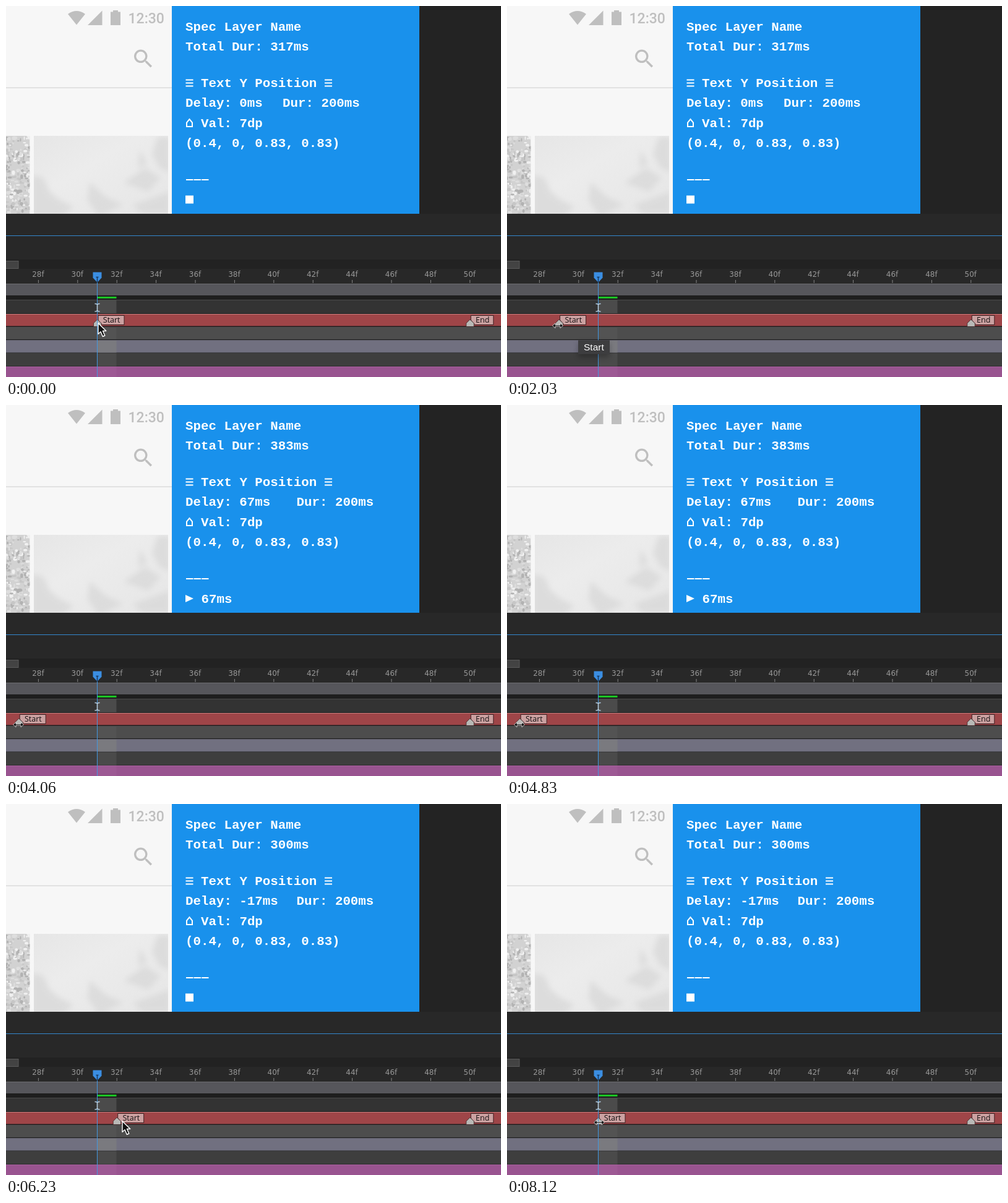
Recreate the animation shown at these times as an HTML page. Size 800 by 600 pixels, loop 8.19 s.

```html
<!DOCTYPE html>
<html lang="en">
<head>
<meta charset="utf-8">
<title>Layer timing</title>
<style>
  html, body { margin: 0; width: 100%; height: 100%; overflow: hidden; background: #232323; }
  svg { display: block; width: 800px; height: 600px; }
  .spec { font: bold 20.8px "Courier New", "Liberation Mono", monospace; fill: #fff; white-space: pre; }
  .ruler { font: 12px "DejaVu Sans", sans-serif; fill: #979797; text-anchor: middle; }
  .tag { font: 12.5px "Open Sans", sans-serif; fill: #161012; }
  .tip { font: 15.5px "Liberation Sans", Arial, sans-serif; fill: #fff; }
  .clock { font: 500 23px Roboto, sans-serif; fill: #bfbfbf; }
</style>
</head>
<body>
<svg viewBox="0 0 800 600">
  <defs>
    <linearGradient id="photo" x2="1" y2="1">
      <stop offset="0" stop-color="#e6e6e6"/>
      <stop offset=".4" stop-color="#ececec"/>
      <stop offset="1" stop-color="#e6e6e6"/>
    </linearGradient>
    <filter id="soft" x="-50%" y="-50%" width="200%" height="200%"><feGaussianBlur stdDeviation="5"/></filter>
    <filter id="fine" x="-50%" y="-50%" width="200%" height="200%"><feGaussianBlur stdDeviation=".7"/></filter>
    <clipPath id="bigClip"><rect x="45" y="210" width="217" height="126"/></clipPath>
    <clipPath id="smallClip"><rect y="210" width="38.500" height="126"/></clipPath>
  </defs>

  <!-- phone preview -->
  <rect width="268" height="336" fill="#f7f7f7"/>
  <rect y="131.500" width="268" height="1.500" fill="#dcdcdc"/>
  <g fill="#bfbfbf">
    <path d="M100 13Q114 3 128 13L114 30.500Z"/>
    <path d="M132 31H155.500V7.500Z"/>
    <path d="M173 7h8v2.500h4V31h-16V9.500h4z"/>
    <path transform="translate(202 65.500) scale(1.660)" d="M15.500 14h-.79l-.28-.27A6.470 6.470 0 0 0 16 9.500 6.500 6.500 0 1 0 9.500 16c1.610 0 3.090-.59 4.230-1.570l.27.28v.79l5 4.990L20.490 19l-4.990-5zm-6 0a4.500 4.500 0 1 1 0-9 4.500 4.500 0 0 1 0 9z"/>
  </g>
  <text class="clock" x="197.500" y="28">12:30</text>
  <g clip-path="url(#smallClip)">
    <rect y="210" width="38.500" height="126" fill="#d2d2d2"/>
    <g id="foliage" filter="url(#fine)"></g>
  </g>
  <g clip-path="url(#bigClip)">
    <rect x="45" y="210" width="217" height="126" fill="url(#photo)"/>
    <g filter="url(#soft)" fill="#d9d9d9" opacity=".8">
      <path d="M40 275Q62 272 66 290T110 325L90 340H40Z"/>
      <path d="M135 285L160 308 190 322 150 340 132 315Z"/>
      <path d="M245 212L236 240 248 262 266 270V212Z"/>
      <path d="M216 232L228 256 214 262Z"/>
      <path d="M190 286L225 262 250 278 230 300Z"/>
      <path d="M205 322L265 300V336H220Z"/>
    </g>
  </g>

  <!-- spec panel -->
  <rect x="268" width="400" height="336" fill="#1991ec"/>
  <g class="spec">
    <text x="290" y="40">Spec Layer Name</text>
    <text id="total" x="290" y="72"></text>
    <text x="315" y="131">Text Y Position</text>
    <text id="delay" x="290" y="163"></text>
    <text id="dur" y="163">Dur: 200ms</text>
    <text x="315" y="196">Val: 7dp</text>
    <text x="290" y="228">(0.4, 0, 0.83, 0.83)</text>
    <text id="wait" x="315.500" y="320"></text>
  </g>
  <g stroke="#fff" stroke-width="2" fill="none">
    <path d="M290.500 119.500h12M290.500 124.500h12M290.500 129.500h12M515 119.500h12M515 124.500h12M515 129.500h12"/>
    <path d="M292 195V188.500L296.500 183L301 188.500V195Z"/>
    <path d="M291 281h11.500M303.500 281h11.500M316 281h11.500"/>
  </g>
  <rect id="square" x="290" y="306.500" width="13" height="13" fill="#fff"/>
  <path id="play" d="M290 307L303 313 290 319Z" fill="#fff"/>

  <!-- timeline -->
  <rect y="336" width="800" height="264" fill="#282828"/>
  <rect y="371" width="800" height="1" fill="#3588cf"/>
  <rect y="410" width="800" height="15" fill="#222"/>
  <rect x="-1" y="412.500" width="21" height="12" fill="#434343" stroke="#5b5b5b"/>
  <g id="ruler" class="ruler"></g>
  <g id="rows"></g>
  <rect x="148" y="470" width="30.500" height="3" fill="#1cc425"/>

  <g id="startMark"></g>
  <g id="endMark"></g>

  <path d="M147.500 446V600" stroke="#4297e0"/>
  <path d="M140.500 430.500H154.500V439.500L147.500 447 140.500 439.500Z" fill="#3b8ee2"/>
  <path d="M147.500 438V447M145.500 438.500h4" stroke="#17395f" stroke-width="1.500"/>
  <path d="M143.500 481.500q4 0 4 2q0-2 4-2M147.500 483V493M143.500 494q4 0 4-2q0 2 4 2" fill="none" stroke="#b9d3e8" stroke-width="1.500"/>

  <g id="tooltip">
    <rect x="115" y="545" width="51" height="23" rx="3" fill="#000" opacity=".25" filter="url(#soft)"/>
    <rect x="115" y="540.500" width="51" height="22.500" fill="#3d3d3f"/>
    <text class="tip" x="124" y="557">Start</text>
  </g>

  <g id="cursor" stroke-linejoin="round">
    <path id="arrow" d="M0 0V17.500L4 13.800 7.300 21.500 10.800 20 7.500 12.500H12.800Z" fill="#111" stroke="#fff" stroke-width="1.400"/>
    <path id="resize" d="M-8.500 0L-4-4V-1H4V-4L8.500 0 4 4V1H-4V4Z" fill="#111" stroke="#e8e8e8" stroke-width=".8"/>
  </g>
</svg>
<script>
const LOOP = 8190, STEP = 70, FRAME_WIDTH = 31.7;
const $ = id => document.getElementById(id);
const frameX = frame => 147.5 + (frame - 31) * FRAME_WIDTH;

function add(parent, tag, attrs, text) {
  const el = document.createElementNS('http://www.w3.org/2000/svg', tag);
  for (const key in attrs) el.setAttribute(key, attrs[key]);
  if (text) el.textContent = text;
  return parent.appendChild(el);
}

function seeded(seed) {
  return () => (seed = (seed * 16807) % 2147483647) / 2147483647;
}

function drawFoliage() {
  const rand = seeded(41), shades = ['#b2b2b2', '#c6c6c6', '#dedede', '#f0f0f0'];
  for (let i = 0; i < 200; i++) {
    add($('foliage'), 'ellipse', {
      cx: rand() * 39, cy: 210 + rand() * 126, rx: 1 + rand() * 3, ry: 1 + rand() * 2.5,
      fill: shades[Math.floor(rand() * 4)]
    });
  }
}

function drawRuler() {
  for (let f = 28; f <= 50; f += 2) {
    const x = frameX(f);
    add($('ruler'), 'text', { x: x - .5, y: 438 }, f + 'f');
    add($('ruler'), 'rect', { x: x - .5, y: 443, width: 1, height: 5, fill: '#858585' });
  }
}

// top, height, fill, highlight, fill of the current-frame column
function drawRows() {
  const rows = [
    [450, 18, '#56565b', '#6c6c70'],
    [476, 21, '#333333', '#4b4b4b', '#4b4b4b'],
    [499, 18.5, '#9f4548', '#cf7e7f'],
    [520, 19, '#4d4d4d', '#505050', '#535353'],
    [541, 19.5, '#717080', '#5c5b66', '#7a7a7f'],
    [562, 20.5, '#3e3e3e', '#3a3a3a', '#4a4a4a'],
    [584, 16, '#995490', '#a6609c', '#9d5994']
  ];
  add($('rows'), 'rect', { y: 449, width: 800, height: 151, fill: '#1e1e1e' });
  for (const [y, height, fill, edge, column] of rows) {
    add($('rows'), 'rect', { y, width: 800, height, fill });
    if (column) add($('rows'), 'rect', { x: 148, y, width: 30.5, height, fill: column });
    add($('rows'), 'rect', { y: y - 1, width: 800, height: 1, fill: edge });
  }
}

function drawMark(group, label, width) {
  add(group, 'path', { d: `M1.500 500.500h${width}v15H8L1.500 508Z`, fill: '#cba1a1', stroke: '#3d2022' });
  add(group, 'text', { class: 'tag', x: 9.3, y: 512.3 }, label);
  add(group, 'path', { d: 'M0 507L6.500 513V518.500H-6V513Z', fill: '#b9b9b6', stroke: '#3d2022', 'stroke-width': .8 });
}

const pointerPath = [
  [0, 149, 513], [420, 149, 513], [980, 137, 517], [1330, 146, 517], [1820, 82, 517],
  [2450, 82, 517], [2800, 91, 517], [3290, 59, 517], [3640, 20, 517], [5180, 20, 517],
  [5880, 188, 513], [6800, 188, 513], [7100, 182, 515], [7700, 149, 515], [8120, 149, 515], [8190, 149, 513]
];
const markSteps = [
  [0, 31], [1540, 30], [1680, 29], [3080, 28], [3430, 27],
  [5390, 28], [5460, 29], [5530, 30], [5600, 31], [5670, 32], [7420, 31]
];
const delaySteps = [[0, 0], [2450, 2], [3920, 4], [5950, -1]];
const cursorSteps = [[0, 'arrow'], [560, 'resize'], [5950, 'arrow'], [6930, 'resize']];

const stepAt = (steps, t) => steps.filter(s => s[0] <= t).pop()[1];

function pointerAt(t) {
  const next = pointerPath.findIndex(p => p[0] > t);
  const a = pointerPath[next - 1], b = pointerPath[next];
  const u = (t - a[0]) / (b[0] - a[0]), eased = u * u * (3 - 2 * u);
  return [a[1] + (b[1] - a[1]) * eased, a[2] + (b[2] - a[2]) * eased];
}

const show = (id, visible) => $(id).setAttribute('visibility', visible ? 'visible' : 'hidden');
const toMs = frames => Math.round(frames * 1000 / 60) + 'ms';

function render(t) {
  const frames = stepAt(delaySteps, t), kind = stepAt(cursorSteps, t);
  $('total').textContent = 'Total Dur: ' + toMs(19 + frames);
  $('delay').textContent = 'Delay: ' + toMs(frames);
  $('dur').setAttribute('x', frames ? 469.5 : 447);
  $('wait').textContent = frames > 0 ? toMs(frames) : '';
  show('square', frames <= 0);
  show('play', frames > 0);
  show('tooltip', t >= 1750 && t < 2450);
  show('arrow', kind === 'arrow');
  show('resize', kind === 'resize');
  $('startMark').setAttribute('transform', `translate(${frameX(stepAt(markSteps, t))} 0)`);
  $('cursor').setAttribute('transform', `translate(${pointerAt(t).join(' ')})`);
}

drawFoliage();
drawRuler();
drawRows();
drawMark($('startMark'), 'Start', 42);
drawMark($('endMark'), 'End', 36.5);
$('endMark').setAttribute('transform', `translate(${frameX(50)} 0)`);

const begin = performance.now();
function tick() {
  const t = (performance.now() - begin) % LOOP;
  render(Math.floor(t / STEP) * STEP);
  requestAnimationFrame(tick);
}
tick();
</script>
</body>
</html>
```
